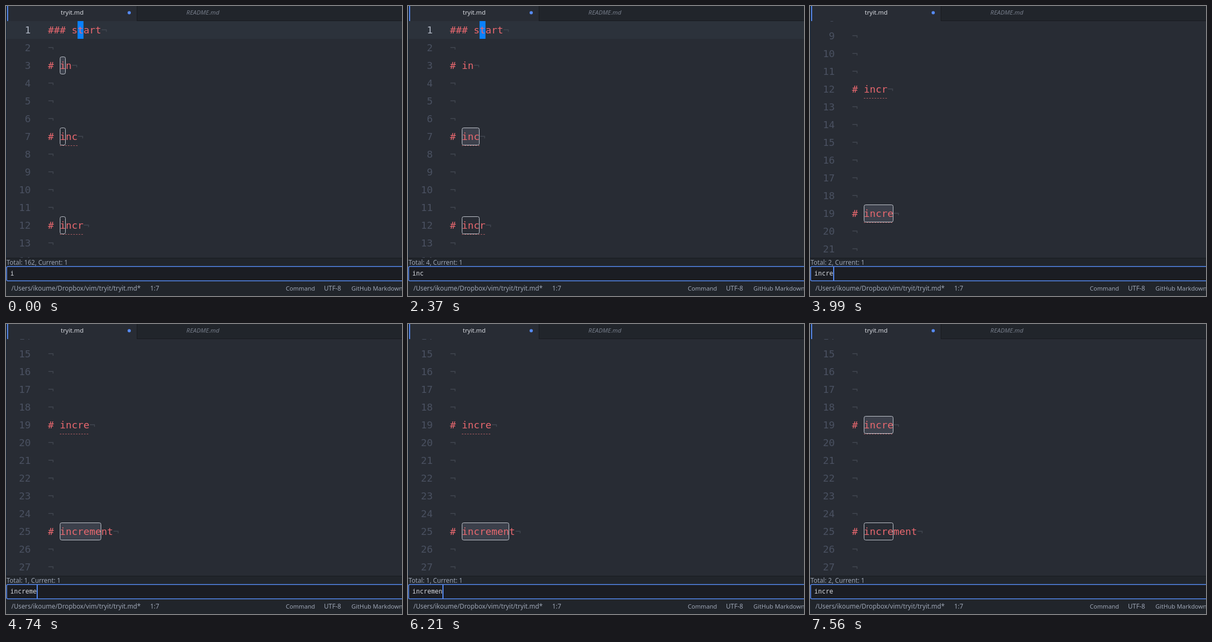
Write an HTML page with a canvas that moves like this. It is 736 by 539 pixels and loops after 8 s.

```html
<!DOCTYPE html>
<html lang="en">
<head>
<meta charset="utf-8">
<title>Incremental search</title>
<style>
  html, body { margin: 0; width: 100%; height: 100%; overflow: hidden; background: #282c34; }
  canvas { display: block; }
</style>
</head>
<body>
<canvas id="stage" width="736" height="539"></canvas>
<script>
const ctx = document.getElementById('stage').getContext('2d');
const W = 736, H = 539, LOOP = 8000;
const TOP = 28, BOTTOM = 468, ROW = 33, CHAR = 11, TEXT_X = 78;
const LOWEST_MATCH = BOTTOM - 3 * ROW; // a match below this row scrolls up to it
const CODE = '18.27px "DejaVu Sans Mono", monospace';
const INPUT = '11.63px "DejaVu Sans Mono", monospace';
const ui = size => `500 ${size}px "Noto Sans", sans-serif`;
const BLUE = '#568af2', RED = '#e9686f', GREY = '#9da5b4', PANEL = '#21252b', EDGE = '#181a1f';

const LINES = { 1: '### start', 3: '# in', 7: '# inc', 12: '# incr', 19: '# incre', 25: '# increment' };
const MISSPELLED = /# inc(r|re)?$/;
const MATCHES_FURTHER_DOWN = { i: 157, in: 18 };

// One character per tick: a letter is typed, "<" deletes, "." waits.
const KEYS = 'i....n......c.....r.e.......m..e.nt.....<..<..<<......';
const TICK = 147.7;

const rowTop = number => TOP + (number - 1) * ROW;
const linesWith = query => Object.keys(LINES).map(Number).filter(n => LINES[n].includes(query));

// Replays the keys; the search result follows the typed text one tick later.
function stateAt(now) {
  let typed = 'i', query = 'i', scroll = 0, lastKey = -5, lastScroll = -Infinity;
  for (let tick = 1; tick <= now; tick++) {
    query = typed;
    const needed = rowTop(linesWith(query)[0]) - LOWEST_MATCH;
    if (needed > scroll) {
      scroll = needed;
      lastScroll = tick;
    }
    const key = KEYS[tick];
    if (key === '.') continue;
    typed = key === '<' ? typed.slice(0, -1) : typed + key;
    lastKey = tick;
  }
  return { typed, query, scroll, caret: (now - lastKey) % 7 < 4, scrollbar: now - lastScroll < 3 };
}

function rect(x, y, w, h, color) {
  ctx.fillStyle = color;
  ctx.fillRect(x, y, w, h);
}

function text(str, x, y, font, color, align = 'left') {
  ctx.font = font;
  ctx.fillStyle = color;
  ctx.textAlign = align;
  ctx.fillText(str, x, y);
}

function roundBox(x, y, w, h, radius, fill, stroke, lineWidth = 1) {
  ctx.beginPath();
  ctx.roundRect(x, y, w, h, radius);
  ctx.fillStyle = fill;
  ctx.fill();
  if (!stroke) return;
  ctx.strokeStyle = stroke;
  ctx.lineWidth = lineWidth;
  ctx.stroke();
}

function drawLine(number, top, query, current) {
  const content = LINES[number] || '', base = top + 23, width = content.length * CHAR;
  if (number === 1) {
    rect(1, top, W, ROW, '#2c323b');
    rect(TEXT_X + 5 * CHAR, top, CHAR, ROW, '#0a80ff');
  }
  if (content.includes(query)) {
    const fill = number === current ? 'rgba(171,178,205,0.15)' : 'transparent';
    roundBox(TEXT_X + 2 * CHAR + 0.5, top + 0.5, query.length * CHAR - 1, ROW - 1, 3, fill, '#c4c8d0');
  }
  text(number, 46, base, CODE, number === 1 ? '#abb2bf' : '#4a5161', 'right');
  text(content, TEXT_X, base, CODE, RED);
  text('¬', TEXT_X + width, base, CODE, '#414650');
  if (MISSPELLED.test(content)) {
    for (let x = 2 * CHAR; x < width; x += 5) {
      rect(TEXT_X + x, top + ROW, Math.min(3, width - x), 1, '#a85a5f');
    }
  }
}

function drawEditor({ query, scroll, scrollbar }) {
  const current = linesWith(query)[0];
  ctx.save();
  ctx.beginPath();
  ctx.rect(0, TOP, W, BOTTOM - TOP);
  ctx.clip();
  const first = Math.floor(scroll / ROW) + 1;
  for (let n = first; n < first + 15; n++) drawLine(n, rowTop(n) - scroll, query, current);
  if (scrollbar) roundBox(727, TOP + 2 + scroll * 0.06, 7, 27, 3.5, 'rgba(255,255,255,0.4)');
  ctx.restore();
}

function drawTabs() {
  rect(0, 0, W, TOP, PANEL);
  rect(0, TOP - 1, W, 1, EDGE);
  rect(2, 0, 241, TOP, '#282c34');
  rect(243, 0, 1, TOP, EDGE);
  rect(2, 0, 2, TOP, BLUE);
  text('tryit.md', 123, 16, ui(11.4), '#d7dae0', 'center');
  text('README.md', 366, 16, 'italic ' + ui(11.4), '#757c89', 'center');
  roundBox(226, 9.5, 6, 6, 3, BLUE);
}

function drawPanel({ typed, query, caret }) {
  const total = linesWith(query).length + (MATCHES_FURTHER_DOWN[query] || 0);
  rect(0, BOTTOM, W, H - BOTTOM, PANEL);
  rect(0, BOTTOM, W, 1, EDGE);
  text(`Total: ${total}, Current: 1`, 1, 481, ui(11.7), GREY);

  roundBox(1.25, 484.25, W + 10, 26.5, 2, '#1b1d23', BLUE, 1.5);
  text(typed, 8, 501, INPUT, '#d7dae0');
  if (caret) rect(8 + typed.length * 7, 485, 2, 25, BLUE);

  text('/Users/ikoume/Dropbox/vim/tryit/tryit.md*', 10, 529, ui(11.8), GREY);
  text('1:7', 268, 529, ui(11.8), GREY);
  text('Command', 520, 529, ui(11.1), GREY);
  text('UTF-8', 591, 529, ui(11.8), GREY);
  text('GitHub Markdown', 642, 529, ui(11.1), GREY);
}

function draw() {
  const tick = Math.floor(performance.now() % LOOP / TICK);
  const state = stateAt(Math.min(tick, KEYS.length - 1));
  rect(0, 0, W, H, '#282c34');
  drawEditor(state);
  drawTabs();
  rect(0, 0, 1, H, '#12263c');
  drawPanel(state);
  requestAnimationFrame(draw);
}
draw();
</script>
</body>
</html>
```
